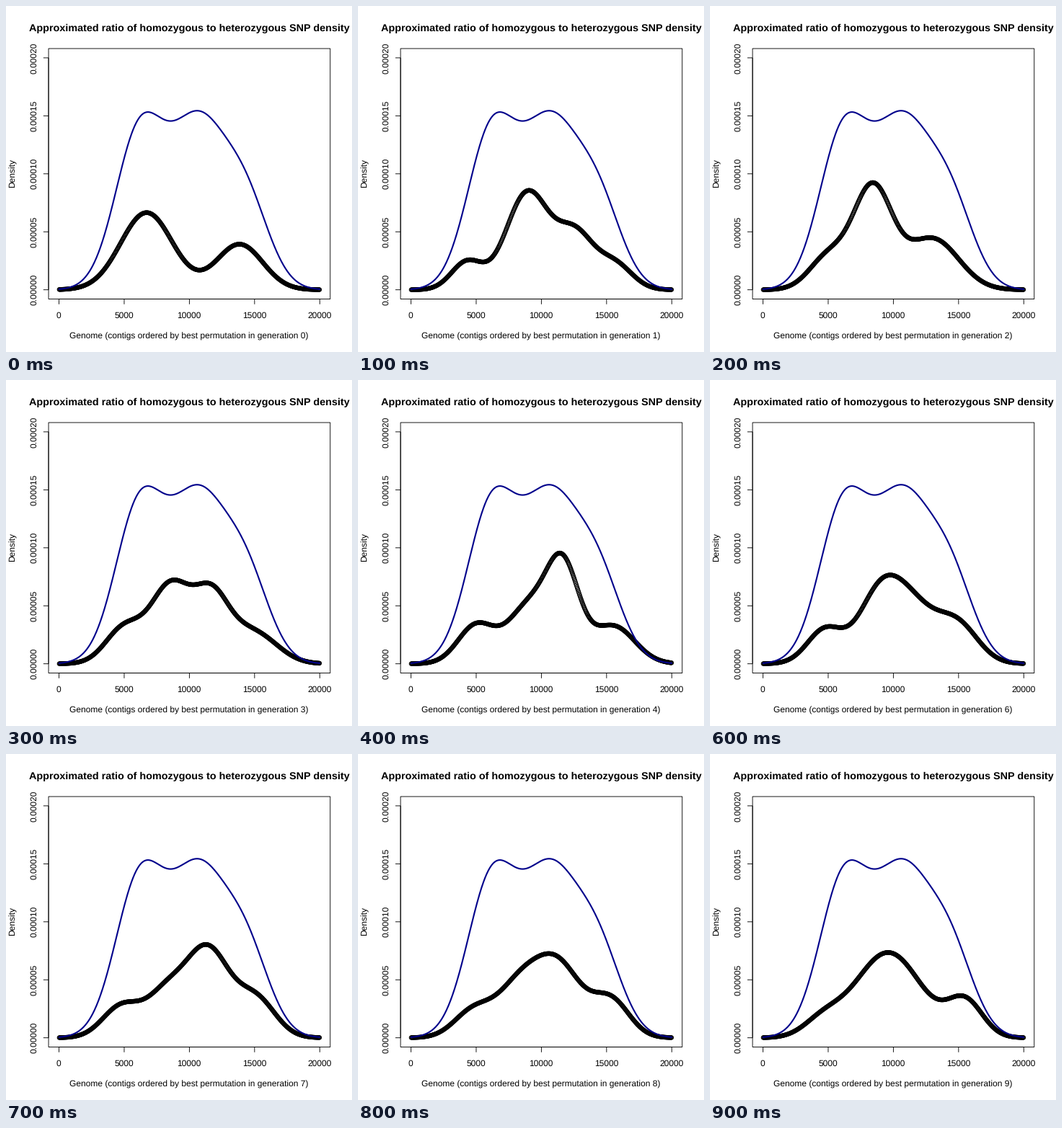
A matplotlib script that plays this animation: 480x480 px, repeating every 1000 ms.

```python
import matplotlib.pyplot as plt
import numpy as np
from matplotlib.animation import FuncAnimation

SIZE, DPI = 480, 72
LEFT, RIGHT, TOP, BOTTOM = 59.04, 449.76, 59.04, 406.56
CENTER_X, CENTER_Y = (LEFT + RIGHT) / 2, (TOP + BOTTOM) / 2
GENOME, MAX_DENSITY = 20000, 0.0002
MARGIN, TICK = 0.04, 7.2
GENERATIONS = 10

plt.rcParams.update({
    "font.family": "Liberation Sans",
    "font.size": 12,
    "text.hinting": "no_hinting",
    "path.snap": False,
})

# Bumps: centre and width in thousands of bases, height in millionths.
REFERENCE = [(6.15, 132, 1.85), (10.6, 139, 2.15), (14.35, 71, 1.8)]
RATIOS = {
    0: [(6.72, 66.5, 1.99), (13.85, 39.2, 1.77)],
    1: [(4.3, 24, 1.2), (8.95, 84, 1.65), (12.6, 46, 1.4), (15.6, 22, 1.35)],
    2: [(5, 28, 1.45), (8.4, 87.5, 1.5), (13, 44, 2)],
    4: [(5, 33, 1.4), (9, 48, 1.6), (11.65, 80, 1.25), (15.5, 32.5, 1.65)],
    5: [(4.75, 32, 1.3), (9.3, 88, 1.6), (14.3, 41, 1.8)],
    7: [(4.8, 27, 1.45), (8.2, 36, 1.5), (11.4, 75, 1.65), (15.1, 33, 1.5)],
    9: [(4.6, 13.5, 1.45), (9.6, 73.5, 2.55), (15.5, 30.5, 1.35)],
}


def density(bumps, x):
    """Sum of Gaussian bumps along the genome."""
    return 1e-6 * sum(height * np.exp(-((x / 1000 - center) / width) ** 2 / 2)
                      for center, height, width in bumps)


def ratio_density(generation, x):
    """A generation's curve, averaged from its neighbours if not described."""
    if generation in RATIOS:
        return density(RATIOS[generation], x)
    return (density(RATIOS[generation - 1], x)
            + density(RATIOS[generation + 1], x)) / 2


def to_x(position):
    return LEFT + (RIGHT - LEFT) * (position / GENOME + MARGIN) / (1 + 2 * MARGIN)


def to_y(value):
    return BOTTOM - (BOTTOM - TOP) * (value / MAX_DENSITY + MARGIN) / (1 + 2 * MARGIN)


fig = plt.figure(figsize=(SIZE / DPI, SIZE / DPI), dpi=DPI, facecolor="white")
ax = fig.add_axes([0, 0, 1, 1])
ax.set_xlim(0, SIZE)
ax.set_ylim(SIZE, 0)
ax.axis("off")


def line(xs, ys):
    ax.plot(xs, ys, color="black", lw=0.9, solid_capstyle="butt",
            solid_joinstyle="miter", zorder=1)


def label(x, y, text, **style):
    """Centred text with its baseline at a pixel position."""
    return ax.text(x, y, text, ha="center", va="baseline",
                   rotation_mode="anchor", **style)


line([LEFT, RIGHT, RIGHT, LEFT, LEFT], [BOTTOM, BOTTOM, TOP, TOP, BOTTOM])
line([to_x(0), to_x(GENOME)], [BOTTOM, BOTTOM])
line([LEFT, LEFT], [to_y(0), to_y(MAX_DENSITY)])

for tick in np.linspace(0, GENOME, 5):
    x = to_x(tick)
    line([x, x], [BOTTOM, BOTTOM + TICK])
    label(x - 0.5, 433, f"{tick:.0f}")
for tick in np.linspace(0, MAX_DENSITY, 5):
    y = to_y(tick)
    line([LEFT - TICK, LEFT], [y, y])
    label(42, y, f"{tick:.5f}", rotation=90)

label(CENTER_X - 0.5, 35,
      "Approximated ratio of homozygous to heterozygous SNP density",
      fontsize=14.4, fontweight="bold")
label(13, CENTER_Y - 1, "Density", rotation=90)
x_label = label(CENTER_X - 0.5, 462, "")

genome = np.linspace(20, GENOME - 20, 512)
ratio = ax.scatter(to_x(genome), 0 * genome, s=5.4 ** 2, facecolors="none",
                   edgecolors="black", linewidths=1, zorder=2)
ax.plot(to_x(genome), to_y(density(REFERENCE, genome)),
        color="darkblue", lw=2.1, zorder=3)


def update(generation):
    heights = to_y(ratio_density(generation, genome))
    ratio.set_offsets(np.column_stack([to_x(genome), heights]))
    x_label.set_text("Genome (contigs ordered by best permutation "
                     f"in generation {generation})")
    return ratio, x_label


animation = FuncAnimation(fig, update, frames=GENERATIONS, interval=100,
                          repeat=True, repeat_delay=0)
plt.show()
```
